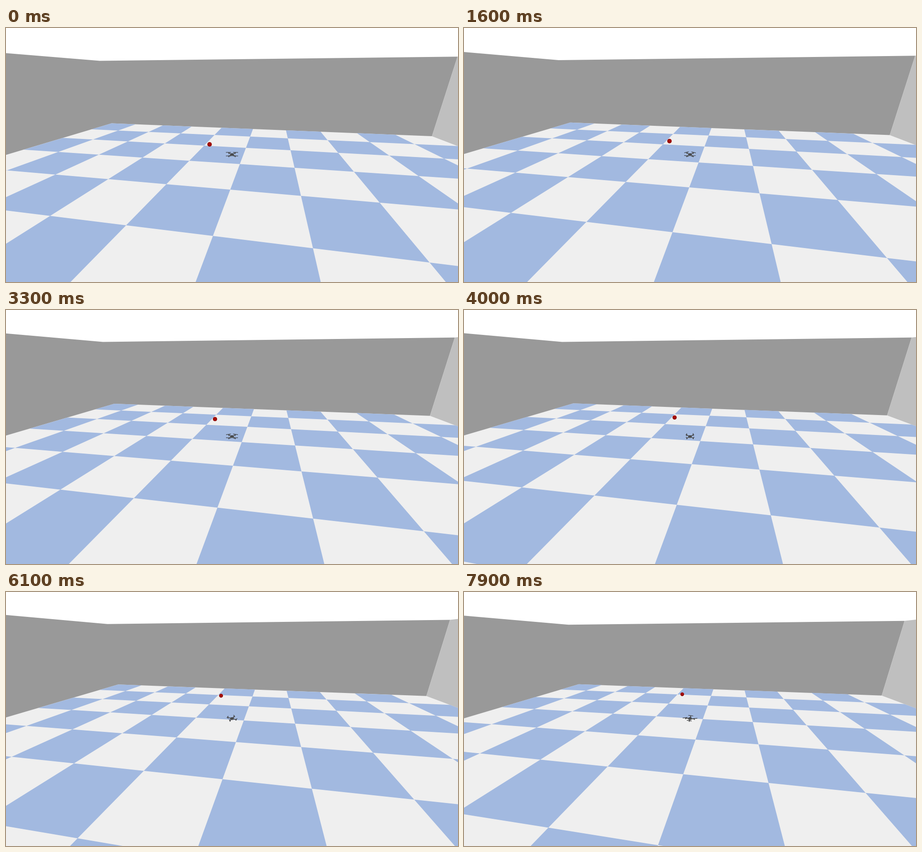
These frames come from a looping animation (998x561 px, 8000 ms). An HTML page with a canvas:

```html
<!DOCTYPE html>
<html lang="en">
<head>
<meta charset="utf-8">
<title>Drone in a room</title>
<style>
  html, body { margin: 0; width: 100%; height: 100%; overflow: hidden; background: #fff; }
  canvas { display: block; width: 998px; height: 561px; }
</style>
</head>
<body>
<canvas id="stage" width="998" height="561"></canvas>
<script>
const ctx = document.getElementById('stage').getContext('2d');
const W = 998, H = 561, CX = W / 2, CY = H / 2;
const LOOP = 8000, STEP = 100;
const rad = Math.PI / 180;
const FOCAL = CY / Math.tan(30 * rad);
const sinP = Math.sin(20 * rad), cosP = Math.cos(20 * rad);
const sinY = Math.sin(10 * rad), cosY = Math.cos(10 * rad);
const ROOM = 4.91, WALL = 2, NEAR = 0.05;

// Camera path: u runs into the room, v to the right, h up
const times = [0, 1.6, 3.3, 4.8, 6.1, 7, 7.9];
const path = {
  u: [-1.807, -1.841, -1.936, -2.037, -2.123, -2.185, -2.248],
  v: [0.521, 0.512, 0.503, 0.494, 0.487, 0.483, 0.4805],
  h: [1.58, 1.559, 1.547, 1.541, 1.5405, 1.546, 1.555],
  yaw: [45, 46, 45, 40, 27, 16, 9]
};

// Smooth curve through unevenly spaced keys
function curve(keys, t) {
  const last = times.length - 1;
  const slope = i => (keys[i + 1] - keys[i]) / (times[i + 1] - times[i]);
  const tangent = i => {
    if (i === 0) return 2 * slope(0) - tangent(1);
    if (i === last) return 2 * slope(last - 1) - tangent(last - 1);
    const a = times[i] - times[i - 1], b = times[i + 1] - times[i];
    return (slope(i - 1) * b + slope(i) * a) / (a + b);
  };
  let i = 0;
  while (i < last - 1 && t > times[i + 1]) i++;
  const d = times[i + 1] - times[i], s = (t - times[i]) / d;
  const s2 = s * s, s3 = s2 * s;
  return (2 * s3 - 3 * s2 + 1) * keys[i] + (s3 - 2 * s2 + s) * d * tangent(i) +
         (3 * s2 - 2 * s3) * keys[i + 1] + (s3 - s2) * d * tangent(i + 1);
}

let cam;

function toView([u, v, h]) {
  const du = u - cam.u, dv = v - cam.v, dh = h - cam.h;
  const fwd = du * cosY - dv * sinY;
  return {
    x: du * sinY + dv * cosY,
    y: fwd * sinP + dh * cosP,
    z: fwd * cosP - dh * sinP
  };
}

const toScreen = p => [CX + FOCAL * p.x / p.z, CY - FOCAL * p.y / p.z];

function clipNear(pts) {
  const out = [];
  pts.forEach((p, i) => {
    const q = pts[(i + 1) % pts.length];
    if (p.z >= NEAR) out.push(p);
    if ((p.z >= NEAR) !== (q.z >= NEAR)) {
      const k = (NEAR - p.z) / (q.z - p.z);
      out.push({ x: p.x + (q.x - p.x) * k, y: p.y + (q.y - p.y) * k, z: NEAR });
    }
  });
  return out;
}

function addFace(corners) {
  const pts = clipNear(corners.map(toView)).map(toScreen);
  pts.forEach(([x, y], i) => i ? ctx.lineTo(x, y) : ctx.moveTo(x, y));
  if (pts.length) ctx.closePath();
}

function fillFace(color, corners) {
  ctx.fillStyle = color;
  ctx.beginPath();
  addFace(corners);
  ctx.fill();
}

function drawRoom() {
  const R = ROOM, low = -0.03;
  ctx.fillStyle = '#fff';
  ctx.fillRect(0, 0, W, H);
  fillFace('#999999', [[-R, -R, low], [-R, -R, WALL], [R, -R, WALL],
                       [R, R, WALL], [R, R, low], [R, -R, low]]);
  fillFace('#bfbfbf', [[R, R, low], [R, R, WALL], [-R, R, WALL], [-R, R, low]]);
  fillFace('#efefef', [[-R, -R, 0], [R, -R, 0], [R, R, 0], [-R, R, 0]]);

  const fit = n => Math.max(-R, Math.min(R, n));
  ctx.fillStyle = '#a2b9e0';
  ctx.beginPath();
  for (let u = -5; u < 5; u++) {
    for (let v = -5; v < 5; v++) {
      if ((u + v) % 2 === 0) continue;
      const u0 = fit(u), u1 = fit(u + 1), v0 = fit(v), v1 = fit(v + 1);
      addFace([[u0, v0, 0], [u1, v0, 0], [u1, v1, 0], [u0, v1, 0]]);
    }
  }
  ctx.fill();
}

function drawBall() {
  const p = toView([0, 0, 1]);
  const [x, y] = toScreen(p);
  const r = FOCAL * 0.02 / p.z;
  const shade = ctx.createRadialGradient(x + r * 0.1, y - r * 0.4, 0, x, y, r);
  shade.addColorStop(0, '#b5120a');
  shade.addColorStop(1, '#8f0803');
  ctx.fillStyle = shade;
  ctx.beginPath();
  ctx.arc(x, y, r, 0, 2 * Math.PI);
  ctx.fill();
}

function line(x0, y0, x1, y1, width, color) {
  ctx.lineWidth = width;
  ctx.strokeStyle = color;
  ctx.beginPath();
  ctx.moveTo(x0, y0);
  ctx.lineTo(x1, y1);
  ctx.stroke();
}

function drawDrone(n, yaw) {
  const rotors = [0, 1, 2, 3].map(i => {
    const a = (yaw + 90 * i) * rad;
    return { i, x: 11 * Math.cos(a), y: 5.6 * Math.sin(a) - 1.2 };
  }).sort((a, b) => a.y - b.y);

  ctx.save();
  ctx.translate(CX, CY - 0.7);
  for (const { i, x, y } of rotors) {
    line(x * 0.2, y * 0.2, x * 0.9, y * 0.9 + 0.8, 1.8, '#55575a');
    line(x * 0.9, y * 0.9 - 0.8, x * 0.9, y * 0.9 + 3, 1.7, '#48494b');
    const spin = n * 2.39 * (i % 2 ? 1 : -1);
    const bx = 5.6 * Math.cos(spin), by = 2.2 * Math.sin(spin);
    line(x - bx, y - by, x + bx, y + by, 1.2, '#3a3b3c');
  }
  ctx.fillStyle = '#505255';
  ctx.beginPath();
  ctx.ellipse(0, 0, 4.2, 3, 0, 0, 2 * Math.PI);
  ctx.fill();
  ctx.fillStyle = '#37383a';
  ctx.fillRect(-3, -2.4, 6, 1.6);
  ctx.restore();
}

function draw(ms) {
  const n = Math.floor((ms % LOOP) / STEP), t = n * STEP / 1000;
  cam = { u: curve(path.u, t), v: curve(path.v, t), h: curve(path.h, t) };
  drawRoom();
  drawBall();
  drawDrone(n, curve(path.yaw, t));
}

const start = performance.now();
function tick() {
  draw(performance.now() - start);
  requestAnimationFrame(tick);
}
tick();
</script>
</body>
</html>
```
